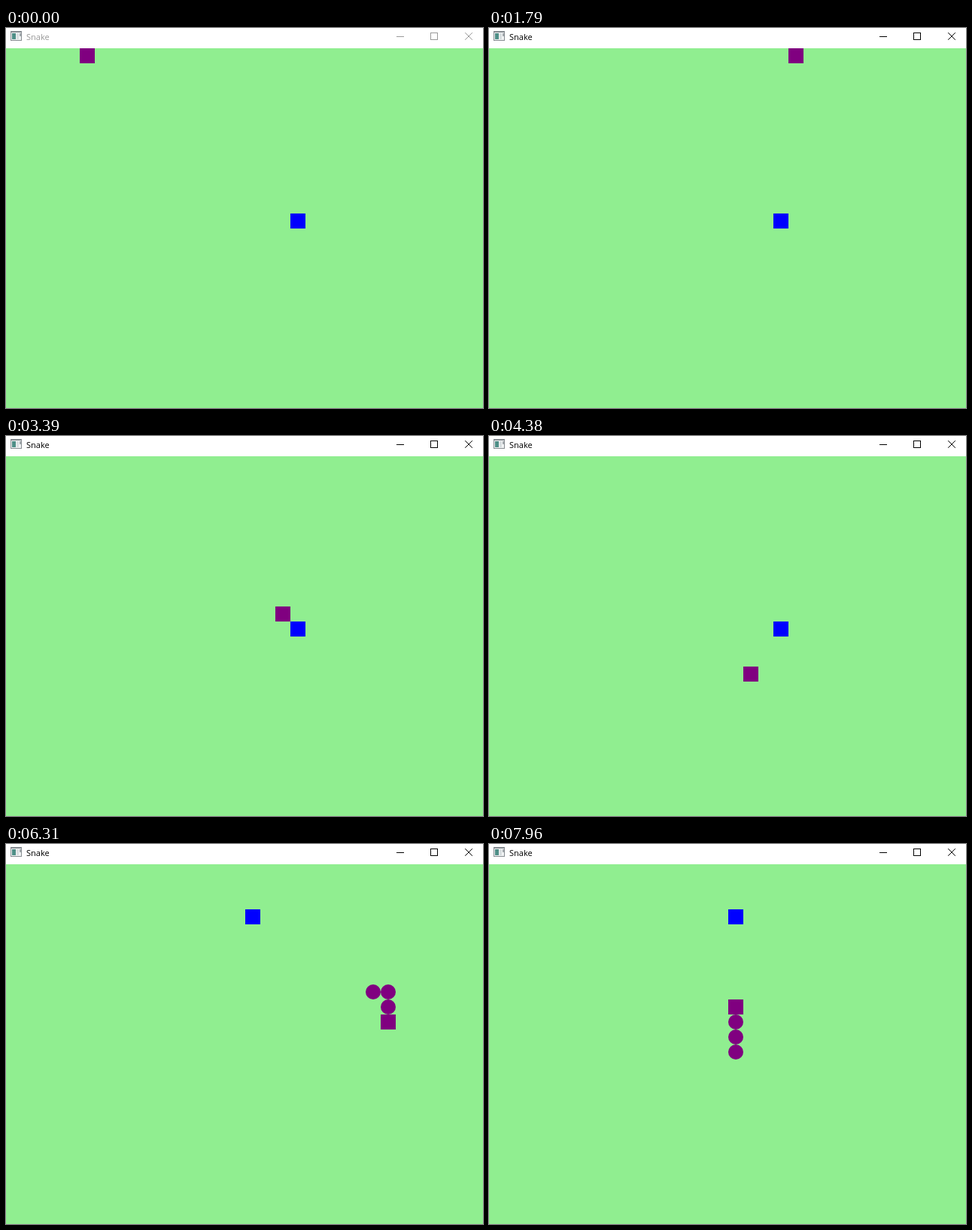
Animation, 634 px wide and 506 px high, one loop 8 s. Source, as an HTML page with a canvas:

```html
<!DOCTYPE html>
<html lang="en">
<head>
<meta charset="utf-8">
<title>Snake</title>
<style>
  html, body { margin: 0; width: 100%; height: 100%; overflow: hidden; background: #90ee90; }
  canvas { display: block; }
</style>
</head>
<body>
<canvas id="stage" width="634" height="506"></canvas>
<script>
const ctx = document.getElementById('stage').getContext('2d');
const LOOP = 8000, CELL = 20, BAR = 27;
const FOCUS_AT = 1110;

const R = [1, 0], L = [-1, 0], U = [0, -1], D = [0, 1];

// direction, number of moves, time of the first and last move
const runs = [
  [R, 4, 70, 380], [R, 2, 530, 650], [R, 7, 790, 1520], [R, 2, 1660, 1790], [R, 1, 1930, 1930],
  [D, 2, 2000, 2000], [D, 3, 2130, 2390], [D, 4, 2530, 2920], [D, 1, 3060, 3060],
  [L, 2, 3120, 3250], [L, 4, 3390, 3780],
  [D, 3, 3850, 4110], [D, 1, 4250, 4250],
  [R, 1, 4320, 4320], [R, 2, 4380, 4510], [R, 1, 4650, 4650],
  [U, 4, 4720, 5110], [U, 2, 5250, 5380],
  [R, 2, 5440, 5570], [R, 3, 5710, 5970], [R, 1, 6110, 6110],
  [D, 4, 6180, 6570],
  [L, 3, 6640, 6900], [L, 2, 7040, 7170], [L, 2, 7230, 7360], [L, 2, 7500, 7630],
  [U, 3, 7700, 7960]
];

const foods = [
  { x: 378, y: 247, grow: 1 },
  { x: 498, y: 187, grow: 2 },
  { x: 318, y: 87, grow: 1 }
];

// Play the game once and keep every state with its start time.
function simulate() {
  let head = { x: 98, y: 27 }, tail = [], meal = 0, pending = 0;
  const states = [{ time: 0, head, tail, food: foods[0] }];
  for (const [dir, count, first, last] of runs) {
    for (let i = 0; i < count; i++) {
      const time = count > 1 ? Math.floor(first + (last - first) * i / (count - 1)) : first;
      tail = [head, ...tail];
      if (pending > 0) pending--;
      else tail.pop();
      head = { x: head.x + dir[0] * CELL, y: head.y + dir[1] * CELL };
      const food = foods[meal];
      if (head.x === food.x && head.y === food.y) {
        pending += food.grow;
        meal++;
      }
      states.push({ time, head, tail, food: foods[meal] });
    }
  }
  return states;
}

const states = simulate();

function box(color, x, y, w, h) {
  ctx.fillStyle = color;
  ctx.fillRect(x, y, w, h);
}

function drawIcon() {
  box('#868c91', 6, 4, 15, 13);
  box('#f1f3f4', 7, 6, 13, 10);
  box('#4f8f88', 8, 7, 5, 8);
  box('#d9dee0', 14, 7, 3, 8);
  box('#a4abae', 18, 7, 2, 4);
}

function drawTitleBar(active) {
  const ink = active ? '#000' : '#999';
  box('#fff', 0, 0, 634, BAR);
  drawIcon();

  ctx.fillStyle = ink;
  ctx.font = '11px "Open Sans", "Noto Sans", sans-serif';
  ctx.textBaseline = 'alphabetic';
  ctx.fillText('Snake', 27, 16);

  ctx.fillRect(519, 11, 10, 1);
  ctx.strokeStyle = ink;
  ctx.lineWidth = 1;
  ctx.strokeRect(564.5, 6.5, 9, 9);
  ctx.beginPath();
  ctx.moveTo(610.2, 6.2);
  ctx.lineTo(619.8, 15.8);
  ctx.moveTo(619.8, 6.2);
  ctx.lineTo(610.2, 15.8);
  ctx.stroke();
}

function drawBoard({ head, tail, food }) {
  box('#90ee90', 0, BAR, 634, 506 - BAR);
  box('#00f', food.x, food.y, CELL, CELL);
  box('#800080', head.x, head.y, CELL, CELL);
  for (const part of tail) {
    ctx.beginPath();
    ctx.arc(part.x + CELL / 2, part.y + CELL / 2, CELL / 2, 0, Math.PI * 2);
    ctx.fill();
  }
}

function draw(now) {
  const t = now % LOOP;
  let current = states[0];
  for (const state of states) if (state.time <= t) current = state;
  drawBoard(current);
  drawTitleBar(t >= FOCUS_AT);
}

let start = null;
function tick(now) {
  if (start === null) start = now;
  draw(now - start);
  requestAnimationFrame(tick);
}
draw(0);
requestAnimationFrame(tick);
</script>
</body>
</html>
```
